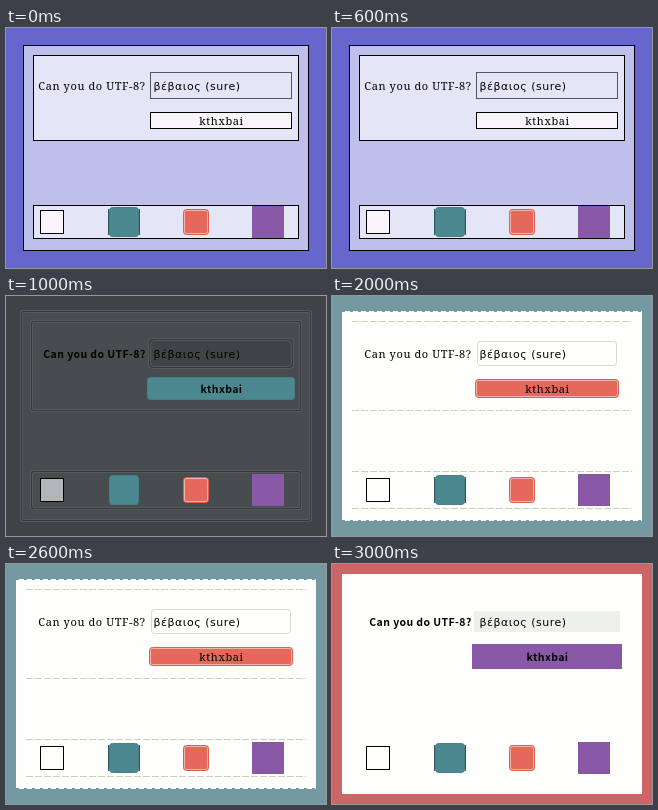
Recreate the animation shown at these times as an HTML page. Size 320 by 240 pixels, loop 4000 ms.

```html
<!DOCTYPE html>
<html lang="en">
<head>
<meta charset="utf-8">
<title>Widget themes</title>
<style>
html, body { margin: 0; width: 100%; height: 100%; overflow: hidden; }
svg { display: block; width: 100vw; height: 100vh; }
text { font-size: 11px; fill: #000; }
.entry { font-family: "DejaVu Sans", sans-serif; letter-spacing: 0.5px; }
.serif { font-family: "Noto Serif", serif; letter-spacing: 0.6px; }
.bold { font-family: "Noto Sans CJK JP", "Noto Sans CJK SC", "Noto Sans", sans-serif; font-weight: 700; font-size: 10.5px; letter-spacing: 0.4px; }
</style>
</head>
<body>
<svg id="stage" viewBox="0 0 320 240"></svg>
<script>
const stage = document.getElementById('stage');
const LOOP = 4000;
const BLACK = '#000', TEAL = '#4c8890', RED = '#e5685a', PURPLE = '#8959a8';

function add(parent, tag, attrs, content = '') {
  const el = document.createElementNS('http://www.w3.org/2000/svg', tag);
  for (const k in attrs) el.setAttribute(k, attrs[k]);
  el.textContent = content;
  parent.append(el);
  return el;
}

// Filled box; a stroke lies on the outermost pixel inside the given bounds.
function box(g, x, y, w, h, fill, stroke, rx = 0) {
  const d = stroke ? 0.5 : 0;
  add(g, 'rect', { x: x + d, y: y + d, width: w - 2 * d, height: h - 2 * d,
    rx, fill, stroke: stroke || 'none' });
}

function line(g, d, stroke, dash = 'none') {
  add(g, 'path', { d, stroke, fill: 'none', 'stroke-dasharray': dash });
}

function redButton(g, x, y, w, h) {
  box(g, x, y, w, h, RED, '#d9604f', 3);
  box(g, x + 1, y + 1, w - 2, h - 2, 'none', '#f5b4aa', 2);
}

function groove(g, x, y, w, h, fill, rx = 2) {
  box(g, x, y, w, h, fill, '#565c5e', rx);
  box(g, x + 1, y + 1, w - 2, h - 2, 'none', '#33383a', rx);
  box(g, x + 2, y + 2, w - 4, h - 4, 'none', '#565c5e', rx);
}

function samples(g, checkFill, sides = true) {
  box(g, 34, 182, 24, 24, checkFill, BLACK);
  if (sides) line(g, 'M102.5 181V207M133.5 181V207', '#32575d');
  box(g, 103, 179, 30, 30, TEAL, '#487f87', 3);
  redButton(g, 177, 181, 26, 26);
  box(g, 246, 178, 32, 32, PURPLE);
}

function labels(g, font) {
  add(g, 'text', { class: font, x: 139.7, y: 62, 'text-anchor': 'end' }, 'Can you do UTF-8?');
  add(g, 'text', { class: 'entry', x: 147.5, y: 62 }, 'βέβαιος (sure)');
  add(g, 'text', { class: font, x: 215.5, y: 97, 'text-anchor': 'middle' }, 'kthxbai');
}

function violet(g) {
  box(g, 0, 0, 320, 240, '#6666cc');
  box(g, 17, 17, 286, 206, '#bfbfec', BLACK);
  box(g, 27, 27, 266, 86, '#e5e5f8', BLACK);
  box(g, 27, 177, 266, 34, '#e5e5f8', BLACK);
  box(g, 144, 44, 142, 27, '#e5e5f8', '#55555c');
  box(g, 144, 84, 142, 17, '#faf5fb', BLACK);
  samples(g, '#faf5fb');
  labels(g, 'serif');
}

function slate(g) {
  box(g, 0, 0, 320, 240, '#404446');
  groove(g, 14, 14, 292, 212, '#474c4e');
  groove(g, 24, 24, 272, 92, '#474c4e');
  groove(g, 24, 174, 272, 40, '#474c4e');
  groove(g, 142, 42, 146, 31, '#404446', 4);
  box(g, 141, 81, 148, 23, TEAL, '#487f87', 3);
  samples(g, '#b2b6b9', false);
  labels(g, 'bold');
}

function paper(g) {
  box(g, 0, 0, 320, 240, '#7499a0');
  box(g, 10, 15, 300, 210, '#fefefc');
  line(g, 'M10 15.5H310M10 224.5H310', '#7499a0', '3 5');
  for (const y of [25.5, 114.5, 175.5, 212.5]) line(g, `M20 ${y}H300`, '#d1cfba', '7 2');
  box(g, 145, 45, 140, 25, '#fefefc', '#d8d9d5', 3);
  redButton(g, 143, 83, 144, 19);
  samples(g, '#fefefc');
  labels(g, 'serif');
}

function rose(g) {
  box(g, 0, 0, 320, 240, '#cc6666');
  box(g, 10, 10, 300, 220, '#fefefd');
  box(g, 142, 47, 146, 21, '#eef0ee');
  box(g, 140, 80, 150, 25, PURPLE);
  samples(g, '#fefefd');
  labels(g, 'bold');
}

// Each theme covers the one before it until the loop restarts.
const themes = [violet, slate, paper, rose];
themes.forEach((draw, i) => {
  const g = add(stage, 'g', {});
  draw(g);
  if (i === 0) return;
  const steps = [[0, 0], [i / themes.length, 1], [1, 1]];
  const anim = g.animate(
    steps.map(([offset, opacity]) => ({ offset, opacity, easing: 'step-end' })),
    { duration: LOOP, iterations: Infinity });
  anim.startTime = document.timeline.currentTime;
});
</script>
</body>
</html>
```
